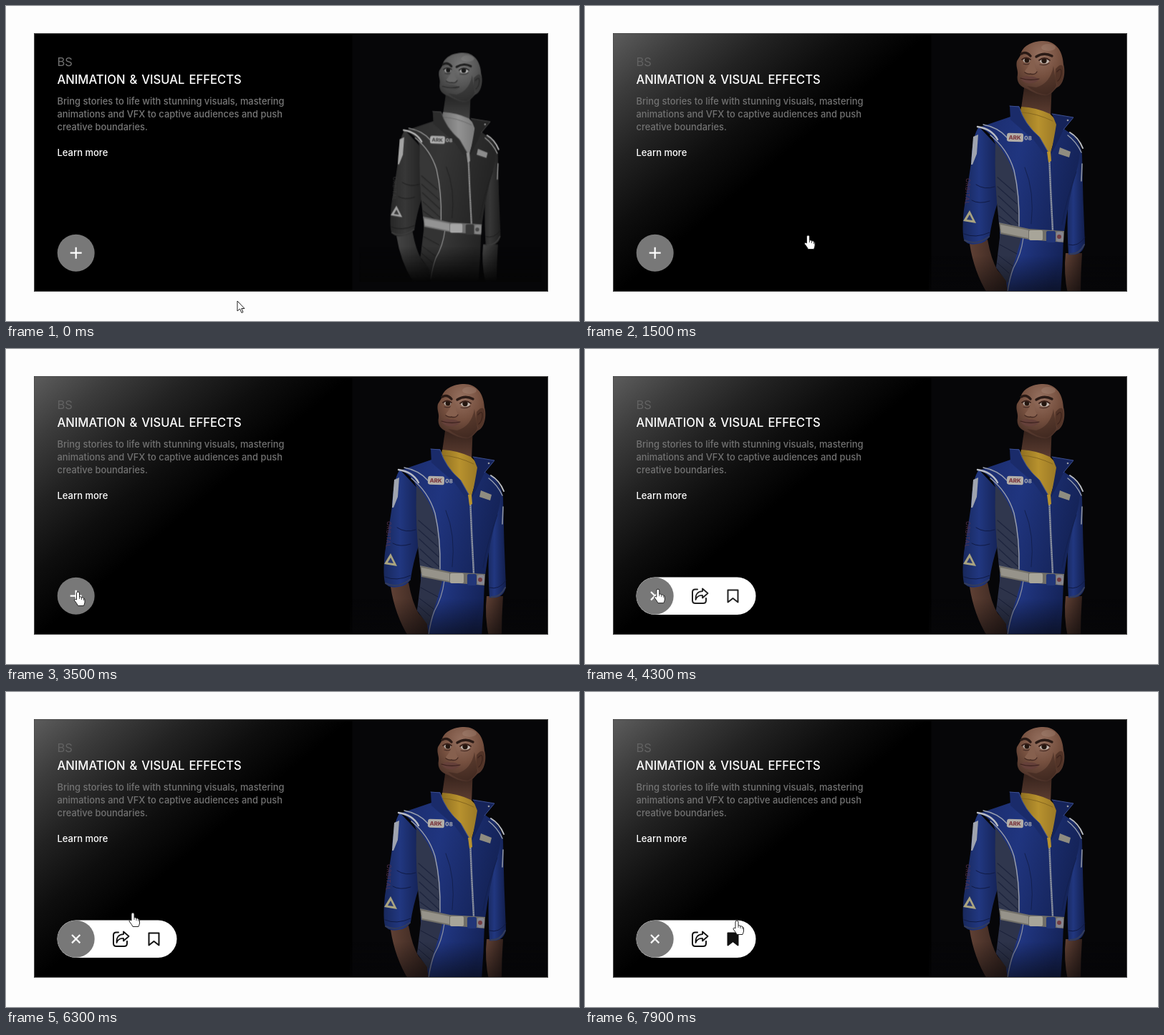
Recreate the animation shown at these times as an HTML page. Size 800 by 441 pixels, loop 8000 ms.

```html
<!DOCTYPE html>
<html lang="en">
<head>
<meta charset="utf-8">
<title>Course card</title>
<style>
html, body { margin: 0; width: 100%; height: 100%; overflow: hidden; background: #fdfdfd; }
svg { display: block; width: 800px; height: 441px; font-family: Inter, sans-serif; }
.line { fill: none; stroke-linecap: round; stroke-linejoin: round; }
</style>
</head>
<body>
<svg viewBox="0 0 800 441">
  <defs>
    <clipPath id="cardClip"><path d="M40 39H756V399H40Z"/></clipPath>
    <linearGradient id="glow" gradientUnits="userSpaceOnUse" x1="39" y1="38" x2="220" y2="256">
      <stop offset="0" stop-color="#5c5c5c"/><stop offset=".25" stop-color="#3c3c3c"/>
      <stop offset=".5" stop-color="#222"/><stop offset=".75" stop-color="#0e0e0e"/>
      <stop offset="1" stop-color="#000"/>
    </linearGradient>
    <linearGradient id="cloth" x1="0" x2="1" y1="0" y2=".3">
      <stop offset="0" stop-color="#1b2c6c"/><stop offset=".45" stop-color="#20357f"/>
      <stop offset="1" stop-color="#15245a"/>
    </linearGradient>
    <linearGradient id="sleeve">
      <stop offset="0" stop-color="#18285c"/><stop offset=".4" stop-color="#213780"/>
      <stop offset="1" stop-color="#121e4c"/>
    </linearGradient>
    <linearGradient id="hand">
      <stop offset="0" stop-color="#5f4034"/><stop offset="1" stop-color="#32211c"/>
    </linearGradient>
    <linearGradient id="wool">
      <stop offset="0" stop-color="#8d6d20"/><stop offset=".5" stop-color="#b8922e"/>
      <stop offset="1" stop-color="#9a7826"/>
    </linearGradient>
    <linearGradient id="neck" x1="0" x2="0" y1="0" y2="1">
      <stop offset=".2" stop-color="#38241d"/><stop offset="1" stop-color="#5e3e32"/>
    </linearGradient>
    <radialGradient id="skin" cx=".5" cy=".25" r=".8">
      <stop offset="0" stop-color="#95705f"/><stop offset=".5" stop-color="#76503f"/>
      <stop offset="1" stop-color="#442c24"/>
    </radialGradient>
    <linearGradient id="fade" x1="0" x2="0" y1="0" y2="1">
      <stop offset="0" stop-color="#060608" stop-opacity="0"/><stop offset="1" stop-color="#060608"/>
    </linearGradient>
  </defs>

  <path fill="#000" d="M39 38H757V400H39Z"/>
  <path id="sheen" fill="url(#glow)" d="M40 39H484V399H40Z"/>
  <path fill="#060608" d="M483.5 39H756V399H483.5Z"/>

  <g clip-path="url(#cardClip)"><g id="figure">
    <!-- hands -->
    <path fill="url(#hand)" d="M537 333L562 327Q567 355 576 370L590 386V403H562Q543 372 537 333Z"/>
    <path fill="url(#hand)" d="M671 346H694Q692 375 692 403H674Q668 374 671 346Z"/>
    <!-- trousers -->
    <path fill="url(#cloth)" d="M579 314L668 326Q667 365 664 403H590L588 384L574 366Q580 340 579 314Z"/>
    <path fill="#2d334a" d="M580 316L610 321Q604 345 590 388L574 366Z"/>
    <path class="line" stroke="#191f38" d="M579 334L603 347M577 349L597 364M576 360L592 374"/>
    <path class="line" stroke="#8b90a0" stroke-width="1.3" d="M612 324Q609 348 598 367Q593 380 590 400"/>
    <!-- sleeves -->
    <path fill="url(#sleeve)" d="M671 174Q691 184 694 208Q695 270 698 332Q696 350 675 348Q671 285 678 235Z"/>
    <path fill="url(#sleeve)" d="M550 169Q541 180 539 220Q533 260 529 285Q526 315 529 327Q534 336 548 333Q560 332 565 322Q568 300 577 272L584 205Z"/>
    <path class="line" stroke="#101a44" d="M529 319Q545 326 565 317M675 334Q688 338 698 324M546 250Q558 258 572 253M540 272Q550 278 565 273"/>
    <path class="line" stroke="#323c5e" stroke-width="2" d="M530 328Q545 336 564 323M677 347Q690 348 697 334"/>
    <!-- torso -->
    <path fill="url(#cloth)" d="M594 155L550 170Q568 176 574 196Q576 255 578 305L620 314L669 317Q675 270 686 232Q694 205 688 189L668 171L648 207Z"/>
    <path fill="#30374e" d="M573 190Q592 212 600 238Q606 270 606 309L578 303Q571 250 573 190Z"/>
    <path class="line" stroke="#1e253e" stroke-width="1.3" d="M576 240L600 261M576 253L603 277M577 266L604 291M578 280L605 305M578 294L596 307"/>
    <path class="line" stroke="#9a9fac" stroke-width="1.4" d="M566 181Q590 200 599 230Q607 265 606 308"/>
    <path class="line" stroke="#13204f" d="M614 226Q628 260 623 305M686 232Q672 270 666 306"/>
    <!-- epaulettes and sleeve marks -->
    <path class="line" stroke="#b9bcc3" stroke-width="2.4" d="M548 169Q568 172 576 187"/>
    <path class="line" stroke="#979eae" stroke-width="1.4" d="M556 166Q577 170 589 184M674 181Q686 190 693 205"/>
    <path class="line" stroke="#b9bcc3" stroke-width="2" d="M677 177Q689 184 695 199"/>
    <path fill="#9fa4af" d="M542 183L549 180L547 207L541 222H539Z"/>
    <path class="line" stroke="#8e94a2" stroke-width="1.6" d="M694 221L693 245"/>
    <path fill="#aaa480" d="M537 286L528 301L546 304Z"/>
    <path fill="#2a3a72" d="M537 292L533 299L541 300Z"/>
    <text transform="translate(532 241) rotate(92)" font-size="8" letter-spacing=".6" fill="#593450">ORBITAL</text>
    <!-- neck and collar -->
    <path fill="url(#neck)" d="M614 108L609 143Q628 151 650 154L652 108Z"/>
    <path fill="url(#wool)" d="M609 141Q630 142 649 151L659 161L657 182L649 208L632 188L607 151Z"/>
    <path class="line" stroke="#86671f" d="M610 149Q630 150 653 161"/>
    <path fill="#1a2b6a" d="M593 140L606 140Q613 165 634 183L649 209L641 207L626 187L594 159Z"/>
    <path class="line" stroke="#3d5092" d="M593 140L606 141Q613 165 635 184L648 207"/>
    <path fill="#16245a" d="M652 151L682 156L668 173Q662 187 650 209Q655 185 658 166Z"/>
    <path class="line" stroke="#3d5092" d="M652 151L682 156L668 173"/>
    <circle cx="674" cy="160" r="1.3" fill="#989ca6"/>
    <!-- zip -->
    <path class="line" stroke="#8c92a2" stroke-width="2.4" d="M648 208Q650 260 653 314"/>
    <path class="line" stroke="#4a546e" stroke-width="2.4" stroke-dasharray=".6 2.4" style="stroke-linecap:butt" d="M648 220Q650 260 653 314"/>
    <path fill="#b8922e" d="M645 204L650 204L651 217L647 219Z"/>
    <!-- badges -->
    <g transform="rotate(2 600 184)">
      <rect x="589" y="178" width="23" height="12" rx="3" fill="#b3aea8"/>
      <g font-size="8" font-weight="800"><text x="591.5" y="187" fill="#7c3a40">ARK</text><text x="613" y="187" fill="#a0a4ae">08</text></g>
    </g>
    <path fill="#8f8c80" d="M663 198L678 204L676 212L661 207Z"/>
    <!-- belt -->
    <path fill="#716f68" d="M578 303L620 312L669 315L668 331L620 327L580 319Z"/>
    <path fill="#96938a" d="M580 306L619 314V325L581 317Z"/>
    <rect x="620" y="314" width="19" height="14" rx="2" fill="#a8a599"/>
    <rect x="644" y="315" width="13" height="16" rx="2" fill="#223678"/>
    <rect x="658" y="316" width="10" height="14" rx="3" fill="#85858f"/>
    <circle cx="662" cy="323" r="3" fill="#743d44"/>
    <!-- head -->
    <path fill="url(#skin)" d="M608 69C610 56 624 49 640 49C656 49 667 61 668 82C671 91 669 108 661 113C657 114 654 121 648 124C640 128 628 122 617 116C607 113 602 106 604 96C605 90 601 85 603 77Z"/>
    <path fill="#523428" d="M657 88Q666 78 668 87Q669 105 661 111Q655 107 657 88Z"/>
    <path class="line" stroke="#3c231c" stroke-width="1.3" d="M659 92Q666 84 665 95Q664 102 660 105"/>
    <path fill="#38221b" opacity=".5" d="M654 84Q650 108 630 114L617 112Q630 123 645 124Q655 119 658 111Z"/>
    <path class="line" stroke="#2a1a15" stroke-width="3.4" d="M609 67Q616 63 622 70M630 71Q641 64 652 70"/>
    <ellipse cx="616.5" cy="76" rx="5" ry="3.4" fill="#b5aaa3"/>
    <ellipse cx="641.5" cy="77" rx="6.5" ry="3.8" fill="#c2b8b1"/>
    <circle cx="617" cy="76" r="3.4" fill="#24160f"/><circle cx="641" cy="76.5" r="3.7" fill="#24160f"/>
    <path class="line" stroke="#3a211a" stroke-width="1.8" d="M610 75Q616 70 622 75M634 76Q641 70 649 76"/>
    <path class="line" stroke="#4a2f27" stroke-width="1.2" d="M612 81Q618 83 622 80M635 82Q643 84 648 80"/>
    <path fill="#86604e" d="M623 75Q620 84 614 91Q615 96 623 95Q631 97 631 91Q627 86 628 77Z"/>
    <path class="line" stroke="#452a22" stroke-width="1.4" d="M614 93Q618 96 622 95Q628 97 631 92"/>
    <path fill="#65403a" d="M608 101Q616 97 620 99Q628 98 634 103Q626 110 618 108Q611 107 608 101Z"/>
    <path class="line" stroke="#3a201c" stroke-width="1.2" d="M608 101Q620 105 634 102"/>
    <ellipse cx="647" cy="58" rx="10" ry="5" fill="#b89a8a" opacity=".25"/>
    <path id="floor" fill="url(#fade)" d="M480 350H760V404H480Z"/>
  </g></g>
  <path fill="none" stroke="#4a4a4a" d="M39.500 38.500H756.500V399.500H39.500Z"/>

  <text id="degree" x="71.5" y="84" font-size="16.5">BS</text>
  <text x="71.5" y="108.5" font-size="16.6" font-weight="500" word-spacing="1.6" fill="#fff">ANIMATION &amp; VISUAL EFFECTS</text>
  <g id="blurb" font-size="12.9" font-weight="500">
    <text x="71.5" y="138">Bring stories to life with stunning visuals, mastering</text>
    <text x="71.5" y="156">animations and VFX to captive audiences and push</text>
    <text x="71.5" y="174">creative boundaries.</text>
  </g>
  <text x="71.5" y="210" font-size="13" font-weight="500" fill="#fff">Learn more</text>

  <rect id="pill" x="71.5" y="319.5" height="52.5" rx="26.2" fill="#fff"/>
  <g id="icons" class="line" stroke="#111" stroke-width="2">
    <path d="M157 336.500H154Q150 336.500 150 340.500V352Q150 356 154 356H165Q169 356 169 352V349"/>
    <path stroke-width="1.8" d="M164 335.500L171.500 342L164 348.500V345Q157 344.500 154.500 351Q154 339.500 164 339.200Z"/>
    <path id="bookmark" d="M199.500 337.500H213.500V354.500L206.500 349L199.500 354.500Z"/>
  </g>
  <circle cx="97.700" cy="345.700" r="26" fill="#787878"/>
  <path id="plus" stroke="#fff" stroke-width="2.2" d="M-8 0H8M0-8V8"/>
  <g id="cursor" stroke="#222" stroke-linejoin="round">
    <path id="arrow" fill="#fff" d="M0 0V14L3.500 11L6 16.500L8 15.500L5.800 10.500H10Z"/>
    <g id="pointer">
      <path fill="#fff" d="M-2 2Q-2 0 0 0Q2 0 2 2V7Q4 6 5 8Q7 7 8 9Q9.500 9 9.500 11V15Q9 17 8 19.500H0Q-1 17-5 12Q-5 9-2 11Z"/>
      <path fill="none" stroke-width=".8" d="M2 7V10M5 8V11M8 9V12"/>
    </g>
  </g>
</svg>
<script>
const $ = id => document.getElementById(id);
const LOOP = 8000;

// cursor stops: time, x, y
const stops = [
  [0, 323, 413], [100, 323, 413], [900, 311.5, 321], [2400, 311.5, 321], [3300, 100.5, 340],
  [4200, 100.5, 340], [4850, 121, 281], [5300, 121, 281], [6300, 177, 309],
  [6500, 177, 309], [7500, 212, 320], [LOOP, 212, 320]
];

function ramp(t, from, to) {
  const p = Math.min(1, Math.max(0, (t - from) / (to - from)));
  return p * p * (3 - 2 * p);
}

const mix = (a, b, p) => a + (b - a) * p;
const gray = v => `rgb(${v},${v},${v})`;

function cursorAt(t) {
  const i = stops.findIndex(s => s[0] > t);
  const [t0, x0, y0] = stops[i - 1], [t1, x1, y1] = stops[i];
  const p = ramp(t, t0, t1);
  return [mix(x0, x1, p), mix(y0, y1, p)];
}

function draw(t) {
  const hover = ramp(t, 250, 900);
  const open = ramp(t, 3800, 4300);
  const [x, y] = cursorAt(t);
  const onCard = y < 400;

  $('sheen').style.opacity = hover;
  $('figure').setAttribute('transform', `translate(620 219) scale(${mix(.903, 1, hover)}) translate(-620 -219)`);
  $('figure').style.filter = `grayscale(${1 - hover})`;
  $('floor').style.opacity = mix(1, .6, hover);
  $('degree').setAttribute('fill', gray(mix(112, 98, hover)));
  $('blurb').setAttribute('fill', gray(mix(120, 114, hover)));

  $('pill').setAttribute('width', mix(52.5, 167, open));
  $('pill').style.opacity = open > 0 ? 1 : 0;
  $('icons').style.opacity = ramp(t, 4050, 4350);
  $('plus').setAttribute('transform', `translate(97.7 345.7) rotate(${45 * open})`);
  $('bookmark').style.fill = t >= 7400 ? '#111' : 'none';

  $('cursor').setAttribute('transform', `translate(${x} ${y})`);
  $('arrow').style.display = onCard ? 'none' : '';
  $('pointer').style.display = onCard ? '' : 'none';
}

const start = performance.now();
function tick() {
  draw((performance.now() - start) % LOOP);
  requestAnimationFrame(tick);
}
tick();
</script>
</body>
</html>
```
